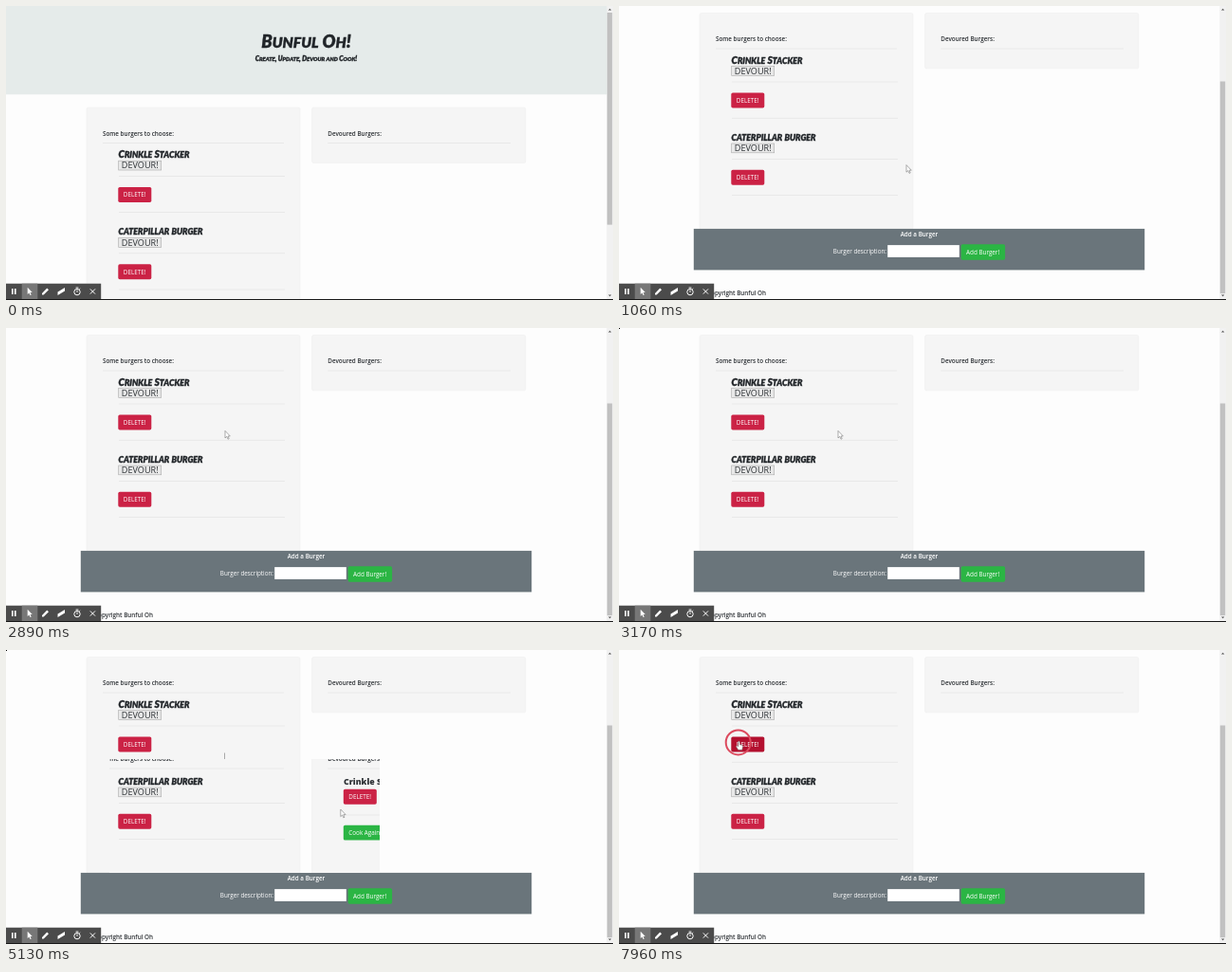
Recreate the animation shown at these times as an HTML page. Size 640 by 310 pixels, loop 8 s.

```html
<!DOCTYPE html>
<html lang="en">
<head>
<meta charset="utf-8">
<title>Burger list</title>
<style>
  html, body { margin: 0; width: 100%; height: 100%; overflow: hidden; background: #fdfdfd; }
  svg { display: block; width: 100vw; height: 100vh; }
  text { font: 6.3px "Open Sans", "Noto Sans", sans-serif; fill: #2b2f33; white-space: pre; }
  .bold { font-weight: 600; }
  .marker { font-family: Lato, sans-serif; font-weight: 900; font-style: italic; fill: #212529; stroke: #212529; stroke-width: .35px; }
  .light text, text.light { fill: #fff; }
  .red rect { fill: #cb2245; }
  .green rect { fill: #2bb544; }
  .red.hover rect { fill: #b3102f; }
  .grey .btn rect { fill: #d5d7d8; }
  .grey .btn text { fill: #212529; }
</style>
</head>
<body>
<svg id="stage" viewBox="0 0 640 310" preserveAspectRatio="none"></svg>
<script>
const LOOP = 8000, SCROLL = 99.5;
const APP = 'Bunful Oh', BURGER = 'Crinkle Stacker', OTHER = 'caterpillar burger';

const rect = (x, y, w, h, fill, extra = '') =>
  `<rect x="${x}" y="${y}" width="${w}" height="${h}" fill="${fill}" ${extra}/>`;
const text = (x, y, s, cls = '', extra = '') =>
  `<text x="${x}" y="${y}" class="${cls}" ${extra}>${s}</text>`;
const rule = (x1, x2, y) => rect(x1, y - .3, x2 - x1, .6, '#e0e0e0');
const panel = (x, y, h) => rect(x, y, 225, h, '#f5f5f5', 'rx="1.5" stroke="#ececec" stroke-width=".5"');

// Capital shapes throughout: lower-case letters become smaller capitals.
function marker(x, y, size, s, anchor = 'start') {
  const body = s.replace(/[a-z]+/g, m =>
    `<tspan style="font-size:${size * .85}px">${m.toUpperCase()}</tspan>`);
  return text(x, y, body, 'marker', `text-anchor="${anchor}" style="font-size:${size}px"`);
}

function button(x, y, w, h, label, cls, id = '') {
  return `<g class="btn light ${cls}" ${id && `id="${id}"`}>` + rect(x, y, w, h, '#ccc', 'rx="1.7"') +
    text(x + 5.5, y + h / 2 + 2.3, label) + '</g>';
}

function item(name, y, id) {
  return marker(118.5, y + 3.1, 10.4, name) +
    rect(118.7, y + 6.2, 45, 9.8, '#e8e8e8', 'stroke="#a9a9a9" stroke-width=".6"') +
    text(121.8, y + 14.4, 'DEVOUR!', '', 'style="font-size:9.1px"') +
    rule(119, 294, y + 22.5) +
    button(118.3, y + 33.9, 35, 16, 'DELETE!', 'red', id) +
    rule(119, 294, y + 60.7);
}

const leftHead = y => text(102, y + 29.7, 'Some burgers to choose:', 'bold') + rule(102, 293, y + 37.5);
const rightHead = y => text(339.3, y + 29.7, 'Devoured Burgers:', 'bold') + rule(339.3, 532, y + 37.5);

const page = rect(0, 0, 634, 93.3, '#e5ebea') +
  marker(316.5, 43.9, 18.4, APP + '!', 'middle') +
  marker(316.5, 57.6, 6.9, 'Create, Update, Devour and Cook!', 'middle') +
  panel(85, 107, 228) + panel(322.7, 107, 58.5) +
  leftHead(107) + rightHead(107) +
  item(BURGER, 157, 'del') + item(OTHER, 238.3) +
  rect(78.8, 334.4, 475.4, 43.5, '#6a757b') +
  text(316.5, 342.4, 'Add a Burger', 'bold light', 'text-anchor="middle"') +
  text(225.8, 360.6, 'Burger description:', 'light') +
  rect(283.2, 351.6, 75.6, 12.8, '#fff') +
  button(360.6, 350.8, 46.5, 16.4, 'Add Burger!', 'green') +
  text(155, 404, '© Copyright ' + APP, 'bold', 'text-anchor="end"');

// Part of the page after one burger has been devoured.
const patch = rect(109, 115, 285, 120, '#fdfdfd') +
  panel(85, 87.5, 149) + panel(322.7, 87.5, 149) +
  leftHead(87.5) + rightHead(87.5) + item(OTHER, 138.8) +
  text(356, 141.6, BURGER, '', 'style="font-size:8.8px;font-weight:800"') +
  button(355.8, 146.8, 35, 16, 'DELETE!', 'red') +
  rule(356, 532, 174) +
  button(355.8, 184.8, 45, 15.8, 'Cook Again!', 'green');

const arrowPath = 'M0 0V7.6L1.8 6L3 8.8L4.2 8.3L3 5.6H5.3Z';
const toolbar = rect(0, 292.7, 100.2, 16.3, '#4b4b4b') + rect(16.7, 292.7, 16.6, 16.3, '#777') +
  '<g fill="#fff">' + rect(6, 298, 1.6, 6, '#fff') + rect(9, 298, 1.6, 6, '#fff') +
  `<path transform="translate(22.7 296.7) scale(.95)" d="${arrowPath}"/>` +
  '<path d="M38 304.6V302.9L43.2 297.5L45 299.2L39.7 304.6Z"/>' +
  '<path d="M54.5 305V301.5L62 297V300.5Z"/></g>' +
  '<g fill="none" stroke="#fff"><circle cx="75" cy="301.6" r="3.2"/>' +
  '<path d="M73.6 297h2.8M75 299.6v2.2M77.4 298.6l.8-.8"/>' +
  '<path d="M88.8 298.4l5.2 5.2m0-5.2l-5.2 5.2"/></g>';

const stage = document.getElementById('stage');
stage.innerHTML = '<clipPath id="cut"><rect x="109" y="115" width="285" height="120"/></clipPath>' +
  rect(0, 0, 640, 310, '#fdfdfd') + `<g id="page">${page}</g>` +
  `<g id="patch" clip-path="url(#cut)">${patch}</g>` +
  rect(633.4, 0, 6.6, 309, '#f1f1f1') + rect(633.8, 7, 5.4, 223.6, '#c1c1c1', 'id="thumb"') +
  '<path d="M635 4.6h3.4L636.7 2.8ZM635 304.4h3.4L636.7 306.2Z" fill="#555"/>' +
  rect(0, 309, 640, 1, '#181818') + toolbar +
  rect(0, 0, 1, 1, '#000', 'id="dot"') + rect(230, 108.5, .7, 6.5, '#888', 'id="trace"') +
  '<circle id="ring" cx="125.7" cy="97.4" r="13" fill="none" stroke="#dc4a5e" stroke-width="2"/>' +
  `<path id="arrow" d="${arrowPath}" fill="#fff" stroke="#808080" stroke-width=".65"/>` +
  '<path id="hand" d="M-1.3 -4.4Q-.5 -5.2 .2 -4.4V-1.3L2.6 -.7Q3.6 -.4 3.5 .8L2.8 4.3H-1.3L-3.4 .9Q-3.4 -.3 -2.4 0L-1.3 1Z" fill="#fff" stroke="#777" stroke-width=".6"/>';

const el = Object.fromEntries([...stage.querySelectorAll('[id]')].map(e => [e.id, e]));
const show = (e, on) => e.setAttribute('visibility', on ? 'visible' : 'hidden');
const within = (t, a, b) => t >= a && t < b;

// Progress in n equal jumps, the first at a and the last at b.
const steps = (t, a, b, n) =>
  t < a ? 0 : Math.min(n, Math.floor((t - a) / (b - a) * (n - 1) + 1.001)) / n;

// start, end of motion, jumps, from x, y, to x, y, first jump
const moves = [
  [0, 300, 3, 381, 167.6, 303, 167.6, 100],
  [1390, 2550, 8, 303, 167.6, 231, 108.4],
  [4600, 5130, 4, 236, 112, 352.8, 168],
  [5280, 5570, 3, 352.8, 168, 370, 195],
  [7160, 7800, 5, 370, 195, 127, 97]
];

function cursor(t) {
  let m = moves[0];
  for (const next of moves) if (t >= next[0]) m = next;
  const [a, b, n, x0, y0, x1, y1, first = a] = m;
  const k = steps(t, first, b, n);
  return [x0 + (x1 - x0) * k, y0 + (y1 - y0) * k];
}

function draw(t) {
  const k = steps(t, 910, 1060, 2);
  el.page.setAttribute('transform', `translate(0 ${-SCROLL * k})`);
  el.thumb.setAttribute('y', 7 + 72.5 * k);

  show(el.patch, within(t, 4950, 5570));
  show(el.dot, within(t, 3170, 5770));
  show(el.trace, within(t, 4030, 5570));
  stage.classList.toggle('grey', within(t, 5770, 6640));
  el.del.classList.toggle('hover', t >= 7800);
  show(el.ring, t >= 7960);

  const [x, y] = cursor(t);
  const hand = within(t, 5570, 7160) || t >= 7800;
  const hidden = t < 100 || within(t, 4030, 4600);
  el.arrow.setAttribute('transform', `translate(${x} ${y})`);
  el.hand.setAttribute('transform', `translate(${x} ${y + 4})`);
  show(el.arrow, !hand && !hidden);
  show(el.hand, hand);
}

const start = performance.now();
function tick() {
  draw((performance.now() - start) % LOOP);
  requestAnimationFrame(tick);
}
tick();
</script>
</body>
</html>
```
